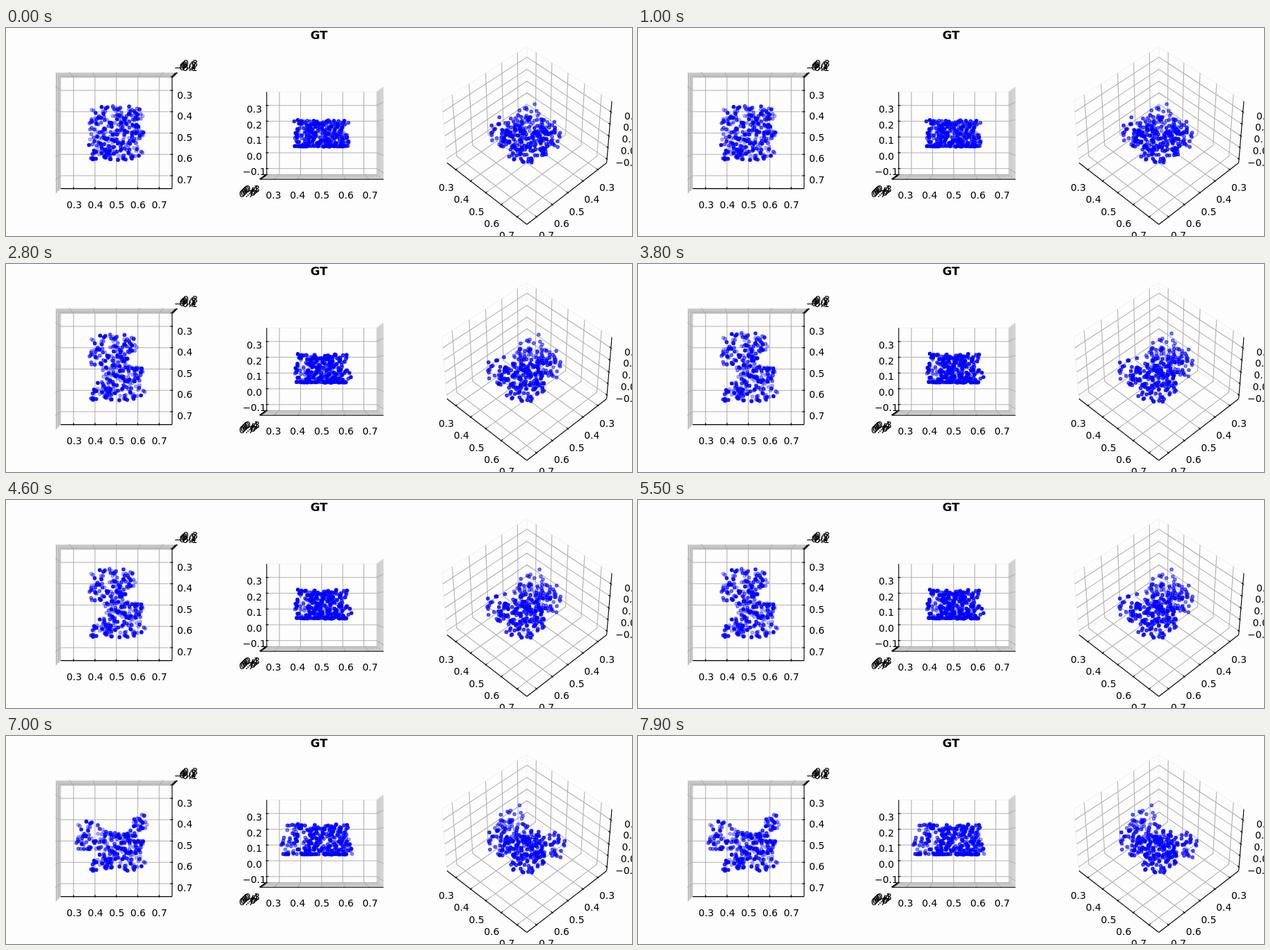
An HTML page with a canvas that plays this animation: 900 px wide and 300 px high, repeating every 8 s.

```html
<!DOCTYPE html>
<html lang="en">
<head>
<meta charset="utf-8">
<title>GT</title>
<style>
  html, body { margin: 0; width: 100%; height: 100%; overflow: hidden; background: #fdfdfd; }
  svg, canvas { position: absolute; left: 0; top: 0; width: 900px; height: 300px; }
  text { font: 13.9px "DejaVu Sans", sans-serif; text-anchor: middle; }
  .title { font-weight: bold; font-size: 16.67px; }
  path { fill: none; stroke-width: 1.1; }
  .pane { stroke: #f0f0f0; }
  .grid { stroke: #b0b0b0; }
  .axis { stroke: #000; }
</style>
</head>
<body>
<svg viewBox="0 0 900 300"><text class="title" x="450" y="16.4">GT</text></svg>
<canvas width="900" height="300"></canvas>
<script>
const svg = document.querySelector('svg');
const ctx = document.querySelector('canvas').getContext('2d');
const HALF = 0.2604, LO = 0.5 - HALF, HI = 0.5 + HALF;
const ZMID = 0.125, ZLO = ZMID - HALF, ZHI = ZMID + HALF;
const LOOP = 8000, STEP = 100, COUNT = 310;
const TICKS = [0.3, 0.4, 0.5, 0.6, 0.7], ZTICKS = [-0.1, 0, 0.1, 0.2, 0.3];

const clamp = x => Math.max(0, Math.min(1, x));
const flat = (v, mid, w) => Math.exp(-Math.pow((v - mid) / w, 4));
const bell = (v, w) => Math.exp(-v * v / (w * w));

// Perspective camera around the box; returns screen x, y and nearness.
function camera(cx, elev, azim) {
  const rad = Math.PI / 180;
  const se = Math.sin(elev * rad), ce = Math.cos(elev * rad);
  const sa = Math.sin(azim * rad), ca = Math.cos(azim * rad);
  return (x, y, z) => {
    const a = (x - 0.5) * 0.5953 / HALF, b = (y - 0.5) * 0.5953 / HALF;
    const c = (z - ZMID) * 0.4464 / HALF;
    const fwd = a * ca + b * sa;
    const near = fwd * ce + c * se;
    const k = 1406 / (10 - near);
    return [cx + (b * ca - a * sa) * k, 151.5 - (c * ce - fwd * se) * k, near];
  };
}

// Label runs: start and end centre of each row, one row per axis.
const views = [
  { cam: camera(158.7, 90, 0), wall: LO,
    x: [257, 96.5, 257, 219], y: [98, 255, 220.5, 255], z: [258.5, 57, 265, 51] },
  { cam: camera(453.8, 0, 0), wall: HI,
    x: [354, 231.5, 346, 239], y: [384.5, 241, 523.5, 241], z: [357, 207, 357, 117] },
  { cam: camera(748.8, 45, 45), wall: LO,
    x: [864, 230, 777, 299], y: [633, 230, 720, 299], z: [893, 194, 900, 126.5] }
];

function add(tag, attrs, text) {
  const el = document.createElementNS('http://www.w3.org/2000/svg', tag);
  for (const key in attrs) el.setAttribute(key, attrs[key]);
  if (text) el.textContent = text;
  svg.appendChild(el);
}

function line(cam, cls, ...pts) {
  const d = pts.map(p => cam(...p).slice(0, 2).map(n => n.toFixed(2)).join(' '));
  add('path', { class: cls, d: 'M' + d.join('L') });
}

function labels([x0, y0, x1, y1], values) {
  values.forEach((v, i) => {
    const f = i / 4;
    add('text', { x: x0 + (x1 - x0) * f, y: y0 + (y1 - y0) * f + 5 },
      v.toFixed(1).replace('-', '\u2212'));
  });
}

function drawBox(view) {
  const { cam, wall } = view;
  const open = LO + HI - wall;
  const out = Math.sign(open - wall) * HALF / 60, inn = -2 * out;
  line(cam, 'pane', [LO, LO, ZLO], [LO, LO, ZHI], [LO, HI, ZHI], [LO, HI, ZLO], [LO, LO, ZLO]);
  line(cam, 'pane', [LO, wall, ZHI], [HI, wall, ZHI], [HI, wall, ZLO], [LO, wall, ZLO]);
  line(cam, 'pane', [HI, wall, ZLO], [HI, open, ZLO], [LO, open, ZLO]);
  for (const t of TICKS) {
    line(cam, 'grid', [t, open, ZLO], [t, wall, ZLO], [t, wall, ZHI]);
    line(cam, 'grid', [HI, t, ZLO], [LO, t, ZLO], [LO, t, ZHI]);
  }
  for (const t of ZTICKS) line(cam, 'grid', [HI, wall, t], [LO, wall, t], [LO, open, t]);

  line(cam, 'axis', [LO, open, ZLO], [HI, open, ZLO]);
  line(cam, 'axis', [HI, LO, ZLO], [HI, HI, ZLO]);
  line(cam, 'axis', [LO, open, ZLO], [LO, open, ZHI]);
  const e = HALF / 60;
  for (const t of TICKS) {
    line(cam, 'axis', [t, open + out, ZLO], [t, open + inn, ZLO]);
    line(cam, 'axis', [HI + e, t, ZLO], [HI - 2 * e, t, ZLO]);
  }
  for (const t of ZTICKS) line(cam, 'axis', [LO, open + out, t], [LO, open + inn, t]);
  labels(view.x, TICKS);
  labels(view.y, TICKS);
  labels(view.z, ZTICKS);
}

function seeded(s) {
  return () => {
    s = (s + 0x6D2B79F5) | 0;
    let t = Math.imul(s ^ (s >>> 15), 1 | s);
    t = (t + Math.imul(t ^ (t >>> 7), 61 | t)) ^ t;
    return ((t ^ (t >>> 14)) >>> 0) / 4294967296;
  };
}

// A block of clay: u across, v down as seen from above, h is height.
const rnd = seeded(41);
const clay = Array.from({ length: COUNT }, () => ({
  u: rnd() * 78 - 39,
  v: rnd() * 78 - 39,
  h: rnd() < 0.2 ? 0 : rnd()
}));

const squeeze = [[0, 0], [1900, 0.02], [2000, 0.05], [2400, 0.45], [2800, 0.82], [3300, 1], [8000, 1]];
const split = [[0, 0], [5500, 0], [6300, 0.46], [7000, 1], [8000, 1]];

function level(table, t) {
  const i = table.findIndex(p => p[0] > t);
  const [t0, a] = table[i - 1], [t1, b] = table[i];
  return a + (b - a) * (t - t0) / (t1 - t0);
}

function shape(p, k1, k2) {
  let { u, v } = p;
  // Side pinch: one finger from the left, one from the right.
  const left = 24 * flat(v, 8, 11) * clamp(0.5 - u / 78);
  const right = (11 / (1 + Math.exp((v + 3) / 1.5)) + 16 * flat(v, -7, 5)) * clamp(0.5 + u / 78);
  u += k1 * (left - right + (v > 10 ? 4 * clamp((u + 39) / 78) : 0));
  v *= 1 + k1 * (v < 0 ? 0.34 : 0.2);

  // Second pinch: the upper half is parted, the lower edge is dented.
  const side = Math.tanh(u / 7), mid = bell(u, 10);
  const s = side < 0 ? clamp((14 - v) / 25) : clamp((2 - v) / 20);
  const du = side * s * (side < 0 ? 19 : 17);
  const dv = s * (1 - mid) * (side < 0 ? 22 : 9) + mid * Math.max(0, -5 - v) * 0.85
    - clamp((v - 10) / 30) * (3 + 9 * bell(u, 8));
  u += k2 * du;
  v += k2 * dv;
  const z = 0.047 + p.h * 0.155 * (1 + 0.09 * k1 + 0.06 * k2);
  return [0.5 + v / 321, 0.5 + u / 321, z];
}

function drawCloud(cam, cloud) {
  const dots = cloud.map(p => cam(...p)).sort((a, b) => a[2] - b[2]);
  const far = dots[0][2], span = dots[dots.length - 1][2] - far;
  for (const [x, y, near] of dots) {
    ctx.globalAlpha = 0.3 + 0.7 * (near - far) / span;
    ctx.beginPath();
    ctx.arc(x, y, 2.2, 0, Math.PI * 2);
    ctx.fill();
    ctx.stroke();
  }
}

let shown = -1;
function frame(now) {
  const t = Math.floor(now % LOOP / STEP) * STEP;
  if (t !== shown) {
    shown = t;
    const k1 = level(squeeze, t), k2 = level(split, t);
    const cloud = clay.map(p => shape(p, k1, k2));
    ctx.clearRect(0, 0, 900, 300);
    for (const view of views) drawCloud(view.cam, cloud);
  }
  requestAnimationFrame(tick);
}

const start = performance.now();
function tick() { frame(performance.now() - start); }

ctx.fillStyle = ctx.strokeStyle = '#00f';
ctx.lineWidth = 1.3;
views.forEach(drawBox);
tick();
</script>
</body>
</html>
```
